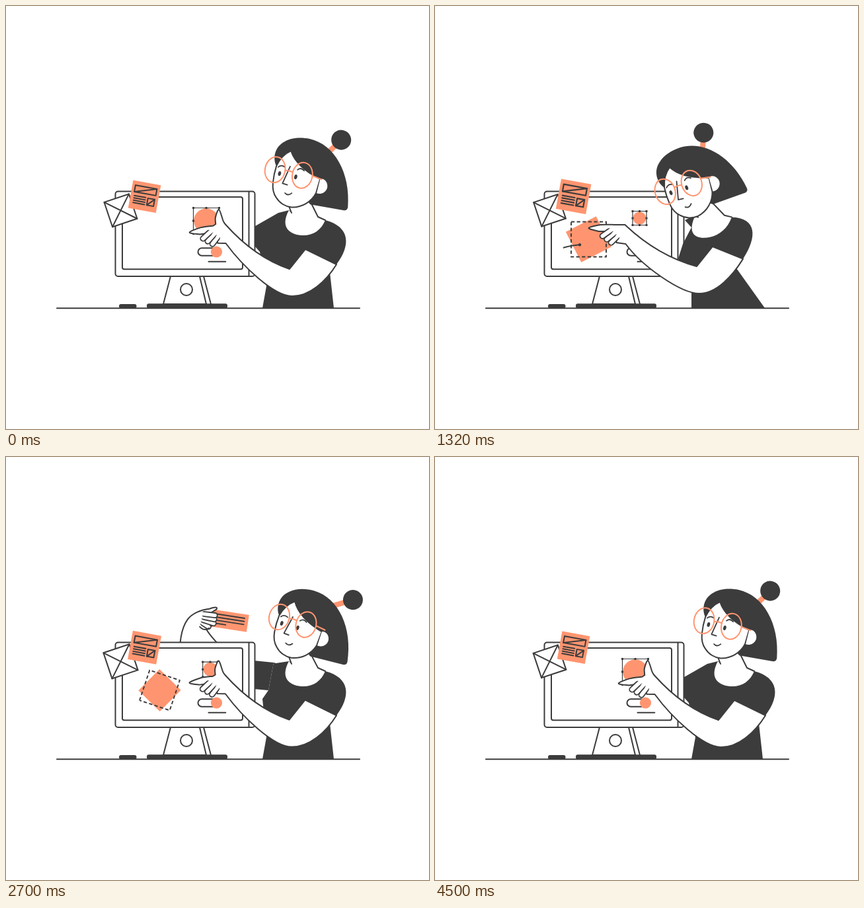
An HTML page with a canvas that plays this animation: 640x640 px, repeating every 4530 ms.

```html
<!DOCTYPE html>
<html lang="en">
<head>
<meta charset="utf-8">
<title>Designer at work</title>
<style>
html, body { margin: 0; width: 100%; height: 100%; overflow: hidden; background: #fff; }
canvas { display: block; width: 640px; height: 640px; }
</style>
</head>
<body>
<canvas id="stage" width="640" height="640"></canvas>
<script>
const ctx = document.getElementById('stage').getContext('2d');
const LOOP = 4530, DARK = '#3c3c3c', ORANGE = '#ff9570', WHITE = '#fff';
const RAD = Math.PI / 180;

// Glasses centre and tilt; the upper body leans along with it
const HEAD = [[0, 427.5, 252, 11.7], [480, 396, 259, 0], [1000, 368, 274.5, -18],
  [1500, 368, 274.5, -18], [2340, 412, 256, 2.7], [2720, 431, 251, 16], [3060, 427.5, 252, 11.7]];
// Wrist x, y, hand tilt, index length, thumb spread, elbow x, y
const ARM = [[0, 332.5, 345, -8, 54, 1, 429, 398], [480, 315, 361, -18, 52, 0, 421, 402],
  [1000, 288.5, 346, 0, 56, 0, 396, 394], [1500, 288.5, 346, 0, 56, 0, 396, 394],
  [2340, 316, 331, -6, 46, 0, 416, 390], [2760, 332.5, 345, -8, 54, 1, 429, 398]];
const CARD = [[1950, 292, 330, -22], [2340, 317, 258, 0], [2850, 341.5, 246.5, 10],
  [3810, 333, 255, 4.5], [4300, 300, 335, -22]];
const BUN_SWING = [[480, 0], [1000, -6], [1500, -6], [2340, -7], [2720, 13], [3400, 0]];

// Monotone cubic interpolation between keys [time, ...values]
function track(keys, t) {
  const last = keys.length - 1;
  if (t <= keys[0][0]) return keys[0].slice(1);
  if (t >= keys[last][0]) return keys[last].slice(1);
  let k = 0;
  while (t >= keys[k + 1][0]) k++;
  const a = keys[k], b = keys[k + 1], dt = b[0] - a[0], u = (t - a[0]) / dt;
  const slope = (i, c) => (keys[i + 1][c] - keys[i][c]) / (keys[i + 1][0] - keys[i][0]);
  const tangent = (i, c) => {
    if (i === 0 || i === last) return 0;
    const p = slope(i - 1, c), q = slope(i, c);
    return p * q <= 0 ? 0 : 2 * p * q / (p + q);
  };
  return a.slice(1).map((v, i) => {
    const c = i + 1, w = b[c], m = tangent(k, c) * dt, n = tangent(k + 1, c) * dt;
    return v + u * (m + u * (3 * (w - v) - 2 * m - n + u * (2 * (v - w) + m + n)));
  });
}
const mix = (a, b, u) => a + (b - a) * u;
const mixPoint = (p, q, u) => [mix(p[0], q[0], u), mix(p[1], q[1], u)];
const add = (p, x, y) => [p[0] + x, p[1] + y];
function ramp(t, from, to) {
  const u = Math.min(1, Math.max(0, (t - from) / (to - from)));
  return 0.5 - 0.5 * Math.cos(Math.PI * u);
}
// Maps local coordinates to the stage for a frame at (x, y) tilted by deg
function frameAt(x, y, deg) {
  const c = Math.cos(deg * RAD), s = Math.sin(deg * RAD);
  return (px, py) => [x + px * c - py * s, y + px * s + py * c];
}

function paint(fill, stroke, width = 2) {
  if (fill) { ctx.fillStyle = fill; ctx.fill(); }
  if (stroke) { ctx.strokeStyle = stroke; ctx.lineWidth = width; ctx.stroke(); }
}
const lines = pts => pts.forEach(p => ctx.lineTo(...p));
const bezier = (a, b, c) => ctx.bezierCurveTo(...a, ...b, ...c);
function line(pts, color = DARK, width = 2) {
  ctx.beginPath();
  lines(pts);
  paint(null, color, width);
}
function poly(pts, fill, stroke, width) {
  ctx.beginPath();
  lines(pts);
  ctx.closePath();
  paint(fill, stroke, width);
}
function spline(pts) {
  ctx.lineTo(...pts[0]);
  for (let i = 0; i < pts.length - 1; i++) {
    const p = pts[i - 1] || pts[i], a = pts[i], b = pts[i + 1], n = pts[i + 2] || b;
    ctx.bezierCurveTo(a[0] + (b[0] - p[0]) / 6, a[1] + (b[1] - p[1]) / 6,
      b[0] - (n[0] - a[0]) / 6, b[1] - (n[1] - a[1]) / 6, ...b);
  }
}
function oval(x, y, rx, ry, fill, stroke, width) {
  ctx.beginPath();
  ctx.ellipse(x, y, rx, ry, 0, 0, 7);
  paint(fill, stroke, width);
}
function box(x, y, w, h, r, fill, stroke, width) {
  ctx.beginPath();
  ctx.roundRect(x, y, w, h, r);
  paint(fill, stroke, width);
}
const centredBox = (size, ...style) => box(-size / 2, -size / 2, size, size, 0, ...style);
function shape(d, fill, stroke, width = 2) {
  const p = new Path2D(d);
  if (fill) { ctx.fillStyle = fill; ctx.fill(p); }
  if (stroke) { ctx.strokeStyle = stroke; ctx.lineWidth = width; ctx.stroke(p); }
}
function placed(x, y, deg, scale, draw) {
  ctx.save();
  ctx.translate(x, y);
  ctx.rotate(deg * RAD);
  ctx.scale(scale, scale);
  draw();
  ctx.restore();
}
// Capsule whose root end stays open towards the palm
function finger(root, tip, width = 9.5) {
  const dx = root[0] - tip[0], dy = root[1] - tip[1], len = Math.hypot(dx, dy);
  line([root, tip], DARK, width);
  line([add(root, dx / len * 4, dy / len * 4), tip], WHITE, width - 3.6);
}

function drawDesk() {
  line([[77, 457.3], [535, 457.3]]);
  box(171, 451, 26.5, 6.5, 3, DARK);
  box(213, 450.3, 122, 7.2, 3, DARK);
}

function drawCardHand(t) {
  if (t < 1950 || t > 4300) return;
  const [x, y, deg] = track(CARD, t);
  placed(x, y, deg, 1, () => {
    box(-28, -13, 56, 26, 0, ORANGE);
    for (let i = 0; i < 4; i++) line([[-22, -7 + 4.7 * i], [i < 3 ? 22 : -5, -7 + 4.7 * i]]);
    shape('M-64 75Q-74 30 -63 8C-58 -2 -45 -10 -33 -13Q-20 -20 -22 -14L-29 -8L-22 8L-32 19Q-22 31 6 50', WHITE, DARK);
    for (let i = 0; i < 4; i++) finger([-39, 10 - 4.7 * i], [i ? -23 : -30, 14 - 6.2 * i], 9);
    shape('M-43 16Q-35 22 -29 16', null, DARK);
  });
}

function drawMonitor() {
  poly([[249, 409], [293, 409], [303, 451], [238, 451]], WHITE, DARK);
  line([[299, 409], [310, 451]]);
  oval(273, 429, 9, 9, WHITE, DARK);
  box(165.5, 280.5, 211, 128.5, 4, WHITE, DARK);
  line([[367.5, 281], [367.5, 409]]);
  box(176, 289, 182, 109.3, 3, WHITE, DARK);
}

function drawSquares(t) {
  const fillIn = ramp(t, 250, 960), dashIn = ramp(t, 180, 700), move = ramp(t, 100, 800);
  const turn = ramp(t, 2000, 3000), stay = 1 - ramp(t, 3750, 4200), dip = Math.sin(Math.PI * turn);
  const x = mix(219, 232.5, move), y = mix(361.3, 353, move);
  if (stay === 0) return;
  placed(x, y, 28 - 55 * fillIn + 90 * turn, stay, () => centredBox(51.5 * fillIn * (1 - 0.2 * dip), ORANGE));
  if (dashIn === 0) return;
  placed(x, y, 76 * (1 - dashIn) - 90 * turn, stay, () => {
    ctx.lineCap = 'butt';
    ctx.setLineDash([5.2 * dashIn, 3.4 * dashIn]);
    centredBox(53 * dashIn * (1 - 0.155 * dip), null, DARK, 1.9 * dashIn);
  });
}

function drawLead(t) {
  const head = ramp(t, 60, 460), tail = ramp(t, 800, 1530);
  if (head <= tail) return;
  const at = u => {
    const v = 1 - u, cubic = (a, b, c, d) => v * v * v * a + 3 * v * v * u * b + 3 * v * u * u * c + u * u * u * d;
    return [cubic(141.5, 146, 172, 219), cubic(429, 390, 365, 361.3)];
  };
  line(Array.from({ length: 41 }, (_, i) => at(mix(tail, head, i / 40))));
  oval(...at(head), 2.2, 2.2, DARK);
}

function drawCircle(t) {
  const grow = 1 - ramp(t, 60, 420) + ramp(t, 2550, 3350);
  const half = 10.5 + 9 * grow, left = 299 - 15.5 * grow, top = 310.5 - 5 * grow;
  oval(left + half, top + half, half - 0.7, half - 0.7, ORANGE);
  box(left, top, 2 * half, 2 * half, 0, null, DARK, 1.2);
  for (let i = 0; i < 9; i++) {
    if (i !== 4) box(left + half * (i % 3) - 1.5, top + half * Math.floor(i / 3) - 1.5, 3, 3, 0, DARK);
  }
}

function drawToggle(t) {
  const on = 1 - ramp(t, 3450, 3750) + ramp(t, 3900, 4230);
  box(290.5, 366.3, 34.5, 11.4, 5.7, WHITE, DARK);
  oval(296 + 22.5 * on, 372, 8.6, 8.6, ORANGE);
  line([[324.5 - 18 * on, 386.8], [332.3, 386.8]]);
}

function drawPapers(t) {
  const phase = 2 * Math.PI * t / LOOP;
  placed(173.5, 309.3, -18.5, 1, () => {
    const size = 39.4 + 1.9 * Math.sin(2 * phase), h = size / 2;
    centredBox(size, WHITE, DARK);
    line([[-h, -h], [h, h]]);
    line([[h, -h], [-h, h]]);
  });
  placed(209.6, 288.3, 10.3, 1 + 0.087 * Math.sin(phase) ** 2, () => {
    centredBox(42.6, ORANGE);
    box(-16.5, -14.5, 33, 10, 0, null, DARK);
    line([[-16.5, -4.5], [16.5, -14.5]]);
    for (let i = 0; i < 4; i++) line([[-15.5, 1.2 + i * 3.6], [2, 1.2 + i * 3.6]]);
    box(5.5, 1.7, 10.4, 10.4, 0, null, DARK);
    line([[5.5, 12.1], [15.9, 1.7]]);
  });
}

const raised = t => ramp(t, 1950, 2340) - ramp(t, 3850, 4280);
// Left armpit and shoulder, from hanging to raised arm
const leftSide = (lean, up) => ({
  shoulder: mixPoint([377 + 11 * lean, 333 + 2 * lean], [405, 311], up),
  armpit: mixPoint([377 - 2 * lean, 364 - 4 * lean], [397, 353], up)
});

function drawLeftSleeve(up, { shoulder, armpit }) {
  if (up > 0) poly([[375, mix(345, 308, up)], shoulder, armpit, [375, mix(360, 351, up)]], DARK);
}

function drawTorso(lean, head, { shoulder, armpit }, up, body) {
  const neckL = body(428, 309), neckR = body(483, 324), bend = body(472, 319), jaw = head(9, 47), nape = head(41, 36);
  ctx.beginPath();
  lines([neckL, mixPoint(body(412, 313), shoulder, up * 0.5), shoulder, armpit,
    mixPoint([384 - 16 * lean, 372 + 10 * lean], [388, 366], up), [394 - 6 * lean, 424],
    [388, 457], [496 + 3 * lean, 457], body(490, 403), body(500, 391)]);
  bezier(body(522, 362), body(521, 334), neckR);
  ctx.closePath();
  paint(DARK);
  ctx.beginPath();
  lines([jaw, body(432, 313), neckL]);
  bezier(body(413, 337), body(432, 347), body(450, 347));
  bezier(body(465, 347), body(477, 339), neckR);
  lines([bend, nape]);
  paint(WHITE);
  line([jaw, body(432, 313)]);
  line([nape, bend, neckR]);
}

function drawArm(t, body) {
  const [x, y, tilt, index, thumb, ex, ey] = track(ARM, t);
  const hand = frameAt(x, y, tilt), elbow = [ex, ey], sleeve = body(500, 391);
  const wristTop = [x, y - 14], wristBottom = [x, y + 14], under = add(elbow, 4, 41);
  const roots = [0, 1, 2].map(i => hand(-14 - 5.5 * i, 4 - 4.5 * i));
  ctx.beginPath();
  ctx.moveTo(...sleeve);
  bezier(add(sleeve, -16, 26), add(under, 26, 0), under);
  bezier(add(under, -28, 0), add(wristBottom, 25, 34), wristBottom);
  lines([hand(-14, 12), ...roots]);
  spline([hand(15 - index, -5), hand(-index, -10), hand(18 - index, -15), hand(-17, -15)]);
  spline([hand(-13, -15 - 2 * thumb), hand(-12, -15 - 12 * thumb), hand(-5, -15 - 23 * thumb),
    hand(-1, -15 - 5 * thumb), wristTop]);
  const [mx, my] = mixPoint(wristTop, elbow, 0.5);
  ctx.quadraticCurveTo(mx - 5, my + 15, ...elbow);
  lines([add(elbow, 24, -30)]);
  ctx.closePath();
  paint(WHITE, DARK);
  roots.forEach((root, i) => finger(root, hand(-22 - 6.5 * i, 12 - 5 * i)));
}

function drawHead(t, x, y, deg) {
  const [swing] = track(BUN_SWING, t), slip = Math.max(0, swing);
  const shut = ramp(t, 3700, 3780) - ramp(t, 3840, 3920);
  placed(x, y, deg, 1, () => {
    ctx.translate(-396, -259);
    ctx.lineCap = 'butt';
    line([[448, 218], [464 + swing, 194.5 + 0.4 * swing]], ORANGE, 8);
    ctx.lineCap = 'round';
    oval(464 + swing, 194.5 + 0.4 * swing, 15, 15, DARK);
    shape('M376 253C368 243 367 225 381 214C390 206 404 202.5 417 202.5C455 203 488 240 494.5 292Q495 297 490 298L438 299.5Z', DARK);
    shape('M376 253C375 262 375 270 376 279C377 288 380 295 385.6 300C392 307 402 310.5 411 309.5C427 307 439 295 443 281L444.8 259C430 255 405 247 393 226C386 231 379 240 376 253Z', WHITE, DARK);
    shape('M444.8 259C450 256 458 261 458 270C457 279 449 282 444 281Z', WHITE);
    [383, 408].forEach(ex => oval(ex, 263.3, 2.3 + shut, 3.6 - 3.1 * shut, DARK));
    shape('M379 254Q383 249 389 252M408.5 252Q413 247 418.5 251.5M396.5 249.5L390.3 276.8L398 277.5M397 290.5Q402 294.5 407 288.5', null, DARK, 1.8);
    ctx.translate(0.12 * slip, -0.3 * slip);
    [375.2, 417.3].forEach(gx => oval(gx, 259, 15.2, 19.6, null, ORANGE));
    shape('M390.5 257Q396 255.5 402 257M432.5 256.5L447 259', null, ORANGE);
  });
}

function draw(t) {
  ctx.fillStyle = WHITE;
  ctx.fillRect(0, 0, 640, 640);
  ctx.lineCap = ctx.lineJoin = 'round';
  const pose = track(HEAD, t), lean = Math.max(0, (427.5 - pose[0]) / 59.5), up = raised(t);
  const body = (x, y) => [x - 34 * lean, y - (x - 462) * 0.22 * lean];
  const side = leftSide(lean, up);
  drawDesk();
  drawLeftSleeve(up, side);
  drawCardHand(t);
  drawMonitor();
  drawSquares(t);
  drawLead(t);
  drawCircle(t);
  drawToggle(t);
  drawPapers(t);
  drawTorso(lean, frameAt(...pose), side, up, body);
  drawArm(t, body);
  drawHead(t, ...pose);
}

function frame() {
  draw(performance.now() % LOOP);
  requestAnimationFrame(frame);
}
frame();
</script>
</body>
</html>
```
